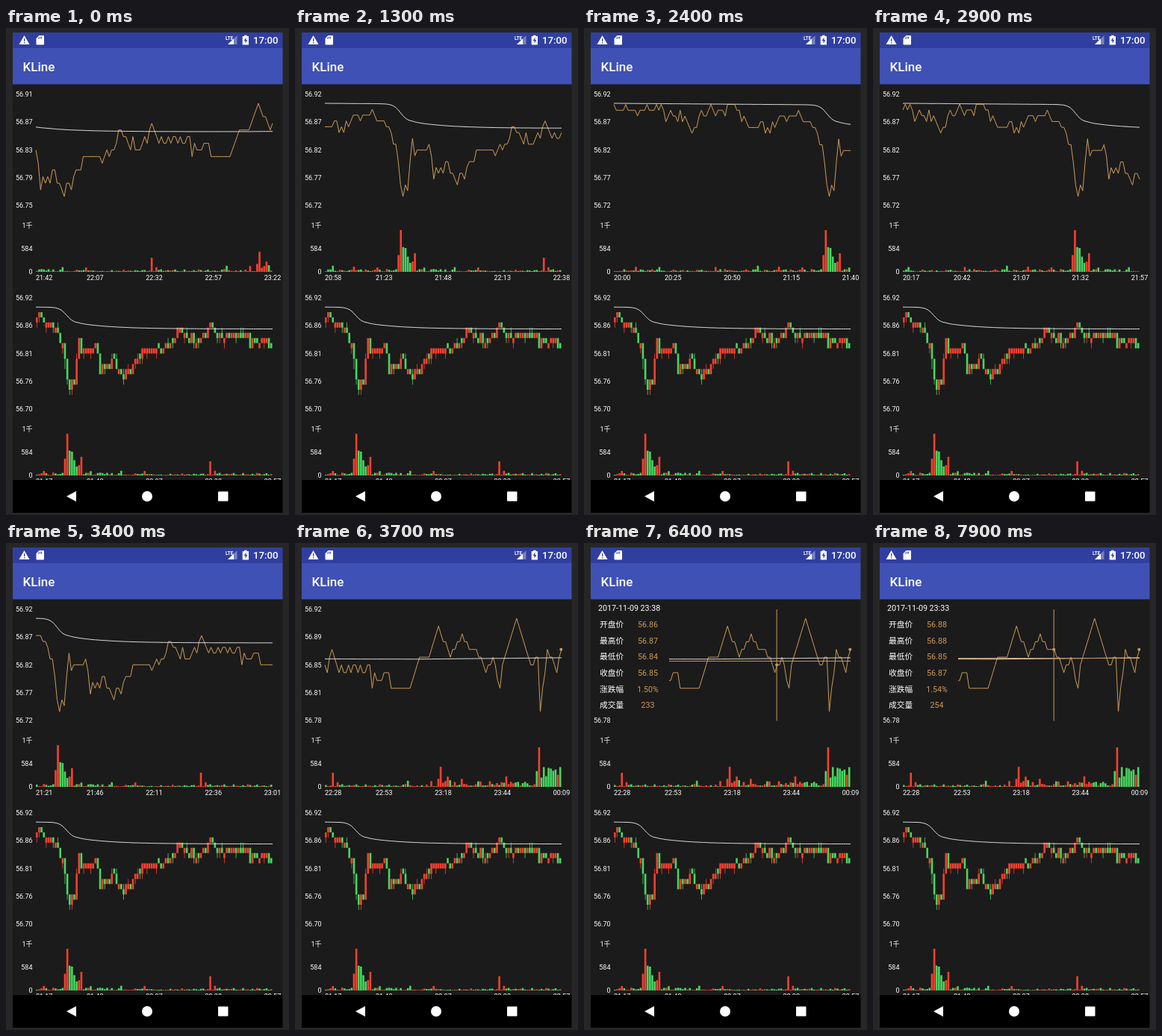
Write an HTML page that moves like this. It is 379 px wide and 653 px high and loops after 8000 ms.

```html
<!DOCTYPE html>
<html lang="zh">
<head>
<meta charset="utf-8">
<title>KLine</title>
<style>
html, body { margin: 0; width: 100%; height: 100%; overflow: hidden; background: #262626; }
svg { display: block; width: 379px; height: 653px; }
text { font-family: Roboto, "Noto Sans CJK SC", "Noto Sans CJK", sans-serif; fill: #fff; }
.axis { font-size: 9px; }
.info { font-size: 10.7px; }
.line { fill: none; stroke-width: 1; stroke-linejoin: round; }
</style>
</head>
<body>
<svg viewBox="0 0 379 653" xmlns="http://www.w3.org/2000/svg">
  <defs>
    <clipPath id="screen"><rect x="9" y="75.500" width="361.500" height="530.500"/></clipPath>
  </defs>
  <rect width="379" height="653" fill="#262626"/>
  <rect x="9" y="75" width="361.500" height="531" fill="#1b1b1b"/>
  <rect x="9" y="6" width="361.500" height="21" fill="#303f9f"/>
  <rect x="9" y="27" width="361.500" height="48.500" fill="#3f51b5"/>
  <rect x="9" y="606" width="361.500" height="44" fill="#000"/>
  <g fill="#fff">
    <path d="M24.5 10L31.5 22H17.5Z"/>
    <path d="M24 14h1.3v4H24zm0 5h1.3v1.4H24z" fill="#303f9f"/>
    <path d="M44.5 10H50q1 0 1 1v10.5q0 1-1 1H41.5q-1 0-1-1V14Z"/>
    <path d="M43.5 12.5v2m2-3v3m2-3v3" stroke="#303f9f"/>
    <path d="M309.5 10V22H297Z" opacity=".35"/>
    <path d="M305 14.5V22H297Z"/>
    <path d="M319 11v-1.3h3.600V11H325v11.500h-8.300V11Z"/>
    <path d="M321.5 12.5l-2.8 4.7h1.9v3.5l2.7-4.7h-1.8Z" fill="#303f9f"/>
    <path d="M81 628L94 621V635Z"/>
    <circle cx="189" cy="628" r="7"/>
    <rect x="284" y="621.5" width="13.5" height="13" rx="1"/>
  </g>
  <text x="294" y="15.5" font-size="6.3" font-weight="700">LTE</text>
  <text x="331" y="21.3" font-size="13.2" font-weight="500">17:00</text>
  <text x="22.5" y="58" font-size="17" font-weight="500">KLine</text>
  <g clip-path="url(#screen)"><g id="upper"></g><g id="lower"></g><g id="cursor"></g></g>
</svg>
<script>
const RED = '#f9402f', GREEN = '#45d860', GOLD = '#cb9a58', WHITE = '#dcdcdc';
const LEFT = 40, SPAN = 100, LAST = 248, STEP = 3.17, SLOT = 3.139;
const TOP = 88.5, HEIGHT = 150, VOLUME_BASE = 327;

// Main swings of the price: [minute index, hundredths above 56]
const swings = [
  [0,89.5],[30,88],[33,85],[36,88],[51,90],[57,86],[68,86],[70,88],[79,88],[85,86],
  [88,83],[91,74],[93,75],[95,84],[96,81],[102,83],[104,77],[109,80],[114,76],[123,82],
  [133,82],[137,86],[146,83],[151,87],[154,84],[161,85],[170,83],[175,84],[176,82],[184,82],
  [188,86],[192,86],[196,90],[201,86],[206,89],[209,87],[212,87],[216,84],[219,86],[222,82],
  [223,85],[229,91],[235,85],[238,86],[239,79],[242,87],[246,84],[248,87]
];
// Bursts of trading: minute index, peak height, minutes of aftermath
const bursts = [[90, 56, 6], [151, 19, 0], [197, 27, 4], [225, 14, 4], [239, 53, 9]];

const random = (i, seed) => {
  const v = Math.sin(i * 12.9898 + seed * 78.233) * 43758.5453;
  return v - Math.floor(v);
};
const lerp = (a, b, p) => a + (b - a) * p;

function price(i) {
  const n = Math.max(1, swings.findIndex(s => s[0] >= i));
  const [x0, y0] = swings[n - 1], [x1, y1] = swings[n];
  const level = Math.round(lerp(y0, y1, (i - x0) / (x1 - x0)));
  if (i > 170 || i === x0 || i === x1) return level;
  const r = random(i, 1);
  return Math.min(90, level + (r > .82) - (r < .18));
}
function mean(i) {
  const fallen = 1 / (1 + Math.exp((90 - i) / 1.5));
  const settled = 85.75 + 1.1 * Math.exp(-Math.max(0, i - 95) / 15) + .003 * Math.max(0, i - 190);
  return lerp(90.2 - .003 * i, settled, fallen);
}
function volume(i) {
  const busy = i > 200 ? 2 : 1;
  let v = busy * (.8 + 3 * random(i, 2) ** 2) + (random(i, 3) < .06 ? 5 : 0);
  for (const [at, peak, tail] of bursts) {
    if (i === at) return peak;
    if (i > at && i <= at + tail) v = peak * lerp(.2, .6, random(i, 7));
    if (tail && i === at - 1) v = peak * .4;
  }
  return v;
}
const minutes = Array.from({ length: LAST + 1 }, (_, i) => {
  const close = price(i), before = price(Math.max(0, i - 1));
  const open = before !== close ? before : close + (random(i, 4) < .82 ? -1 : 1);
  const rising = bursts.some(b => b[0] === i) || random(i, 6) < .55;
  return {
    open, close, rising, mean: mean(i), volume: volume(i),
    high: Math.max(open, close) + (random(i, 5) < .15),
    low: Math.max(72, Math.min(open, close) - (random(i, 8) < .25) - (i > 88 && i < 93))
  };
});

const $ = id => document.getElementById(id);
const xAt = k => LEFT + k * STEP;
const text = (x, y, s, anchor = 'start', cls = 'axis', fill = '#fff') =>
  `<text x="${x}" y="${y}" class="${cls}" text-anchor="${anchor}" style="fill:${fill}">${s}</text>`;
const line = (ys, color) =>
  `<path class="line" stroke="${color}" d="M${ys.map((y, k) => `${xAt(k).toFixed(1)} ${y.toFixed(1)}`).join('L')}"/>`;
const box = (x, y, w, h) => `M${x.toFixed(2)} ${y.toFixed(2)}h${w}v${h.toFixed(2)}h${-w}z`;
const fills = (up, down) => `<path fill="${RED}" d="${up}"/><path fill="${GREEN}" d="${down}"/>`;
const dot = (x, y) => `<circle cx="${x}" cy="${y}" r="2" fill="${GOLD}"/>`;

function clock(i) {
  const t = 1200 + i + (i > 204 ? 1 : 0);
  const two = n => String(n).padStart(2, '0');
  return two(Math.floor(t / 60) % 24) + ':' + two(t % 60);
}
function rangeOf(rows) {
  const all = rows.flatMap(m => [m.close, m.mean]);
  const hi = Math.max(...all), lo = Math.min(...all), pad = (hi - lo) / 10;
  return [lo - pad, hi + pad];
}
const scale = ([lo, hi], dy) => v => TOP + dy + (hi - v) / (hi - lo) * HEIGHT;
const rowsFrom = start => minutes.slice(start, start + SPAN + 1);

function frame(start, rows, [lo, hi], dy) {
  let out = '', up = '', down = '';
  for (let n = 0; n < 5; n++) {
    out += text(35.5, 91.8 + dy + n * 37.4, '56.' + Math.round(lerp(hi, lo, n / 4)), 'end');
    out += text(n ? xAt(n * 25) : LEFT, 338.3 + dy, clock(start + n * 25), n ? 'middle' : 'start');
  }
  ['1千', '584', '0'].forEach((s, n) => out += text(35.5, 267.8 + dy + n * 31, s, 'end'));
  rows.forEach((m, k) => {
    const bar = box(LEFT + k * SLOT, VOLUME_BASE + dy - m.volume, 2.6, m.volume);
    if (m.rising) up += bar; else down += bar;
  });
  return out + fills(up, down);
}
function lineChart(start) {
  const rows = rowsFrom(start), range = rangeOf(rows), y = scale(range, 0);
  return frame(start, rows, range, 0) + line(rows.map(m => y(m.close)), GOLD) +
    line(rows.map(m => y(m.mean)), WHITE) +
    (start + SPAN === LAST ? dot(356.3, y(minutes[LAST].close)) : '');
}
function candleChart(start) {
  const rows = rowsFrom(start), range = [70.2, 91.8], y = scale(range, 273);
  let up = '', down = '';
  rows.forEach((m, k) => {
    const x = LEFT + k * SLOT, top = y(Math.max(m.open, m.close));
    const shape = box(x, top, 2.6, y(Math.min(m.open, m.close)) - top) +
      box(x + .9, y(m.high), .8, y(m.low) - y(m.high));
    if (m.close > m.open) up += shape; else down += shape;
  });
  return frame(start, rows, range, 273) + fills(up, down) + line(rows.map(m => y(m.mean)), WHITE);
}

// The finger drags the crosshair left, easing out over these moments
const moves = [5200, 5700, 6400, 6900, 7300, 7900];
function crosshair(t) {
  const n = moves.filter(m => t >= m).length - 1;
  if (n < 0) return '';
  const p = Math.sin(Math.PI / 2 * n / (moves.length - 1));
  const between = (a, b) => Math.round(lerp(a, b, p));
  const first = LAST - SPAN, i = between(223, 212), close = minutes[i].close;
  const level = lerp(164, 154.5, p).toFixed(1);
  const x = xAt(i - first - .2).toFixed(1), y = scale(rangeOf(rowsFrom(first)), 0)(close);
  const open = between(82, 88);
  const info = [
    ['开盘价', '56.' + open],
    ['最高价', '56.' + Math.max(open, close, between(85, 88))],
    ['最低价', '56.' + Math.min(open, close, between(82, 85))],
    ['收盘价', '56.' + close],
    ['涨跌幅', ((56 + close / 100) / 56.01 * 100 - 100).toFixed(2) + '%'],
    ['成交量', between(204, 254)]
  ];
  return `<path class="line" stroke="${GOLD}" d="M${x} 89V238.5M114 ${level}H357"/>` + dot(x, y) +
    '<rect x="10" y="78" width="104" height="151" fill="#1b1b1b"/>' +
    text(19, 91, '2017-11-09 ' + clock(i), 'start', 'info') +
    info.map(([name, value], row) => text(21, 113 + row * 21.65, name, 'start', 'info') +
      text(85.5, 113 + row * 21.65, value, 'middle', 'info', GOLD)).join('');
}

// Drag back to the first minute, then fling forward to the last
function startAt(step) {
  if (step < 10) return 102;
  if (step <= 17) return Math.round(102 - 10.9 * (step - 9));
  if (step <= 24) return Math.ceil(15 * (1 - (step - 17) / 7) ** 1.5);
  return Math.min(LAST - SPAN, Math.ceil(81 * ((step - 24) / 10) ** 2.3));
}

let shownStep = -1;
function draw(t) {
  const step = Math.floor(t / 100);
  if (step === shownStep) return;
  shownStep = step;
  $('upper').innerHTML = lineChart(startAt(step));
  $('cursor').innerHTML = crosshair(step * 100);
}

$('lower').innerHTML = candleChart(77);
const began = performance.now();
function tick() {
  draw((performance.now() - began) % 8000);
  requestAnimationFrame(tick);
}
tick();
</script>
</body>
</html>
```
